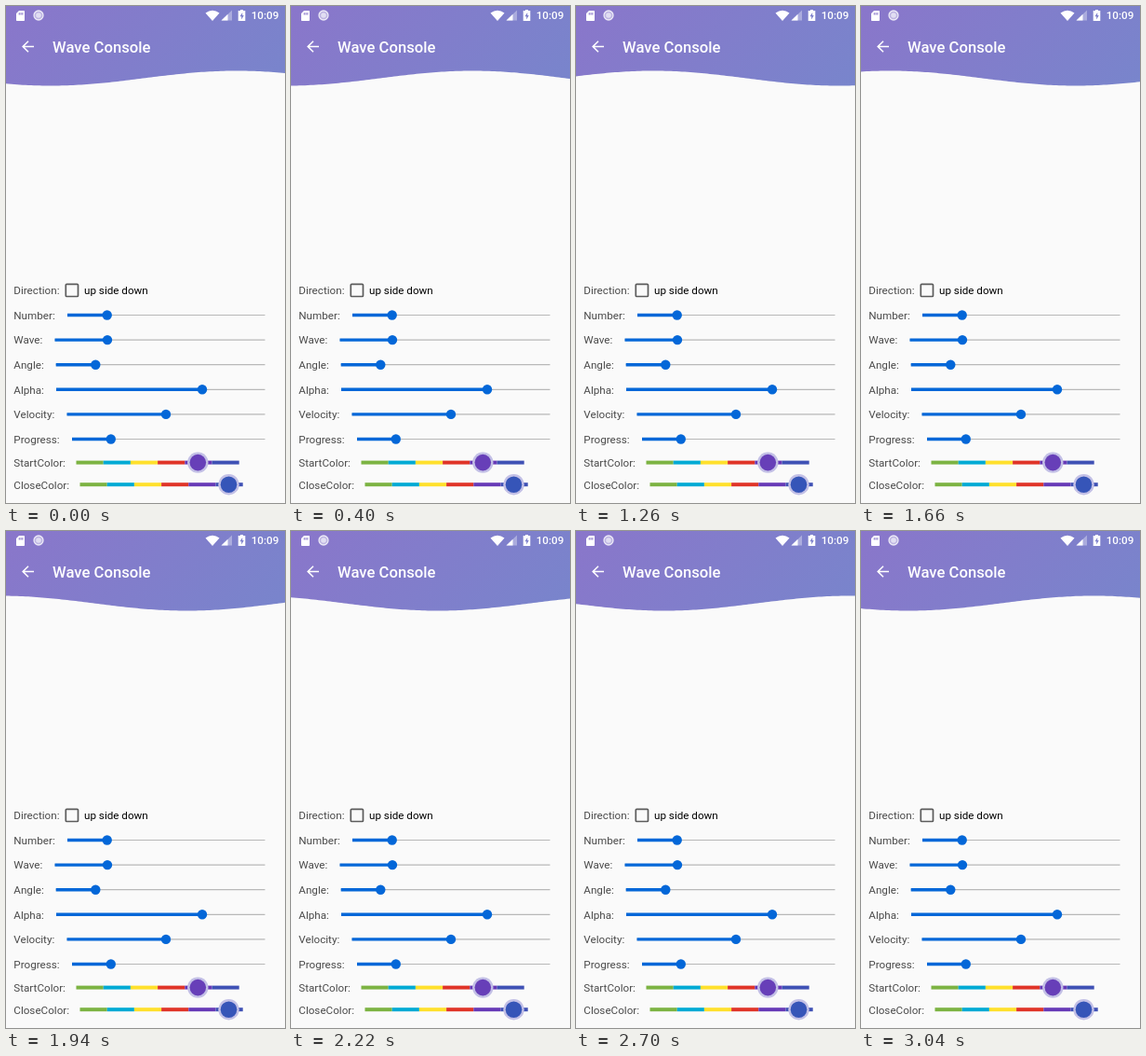
Animation, 300 px wide and 533 px high, one loop 3060 ms. Source, as an HTML page:

```html
<!DOCTYPE html>
<html lang="en">
<head>
<meta charset="utf-8">
<title>Wave Console</title>
<style>
html, body { margin: 0; width: 100%; height: 100%; overflow: hidden; background: #fafafa; }
svg { display: block; font: 11.67px Roboto, sans-serif; }
.label { fill: #4a4a4a; }
.bar { fill: #fff; font-weight: 500; }
</style>
</head>
<body>
<svg id="stage" width="300" height="533" viewBox="0 0 300 533">
  <defs>
    <linearGradient id="tint" gradientUnits="userSpaceOnUse" x1="40" y1="-67" x2="260" y2="153">
      <stop stop-color="#8b75ca"/><stop offset="1" stop-color="#7786cc"/>
    </linearGradient>
  </defs>
  <path id="wave" fill="url(#tint)"/>
  <!-- status bar -->
  <path fill="#fff" fill-rule="evenodd" d="M14 5H19.2Q20 5 20 5.8V15.2Q20 16 19.2 16H11.8Q11 16 11 15.2V8ZM13.7 7.2V9.6H14.8V7.2ZM15.5 7.2V9.6H16.6V7.2ZM17.3 7.2V9.6H18.4V7.2Z"/>
  <circle cx="35" cy="10" r="5" fill="#fff" fill-opacity=".45" stroke="#fff" stroke-opacity=".8" stroke-width="1.3"/>
  <circle cx="35" cy="10" r="2.8" fill="#fff" fill-opacity=".55"/>
  <path fill="#fff" d="M214.5 7.5Q222 2 229.5 7.5L222 16Z"/>
  <path fill="#fff" fill-opacity=".35" d="M243 4.5V15.5H231.5Z"/>
  <path fill="#fff" d="M238.5 8.8V15.5H231.5Z"/>
  <path fill="#fff" fill-rule="evenodd" d="M252 4H255V5H257.3V16H249.7V5H252ZM254.2 7L251.5 11.2H253.2V14.4L255.8 10.1H254.2Z"/>
  <text class="bar" x="263.7" y="14.2">10:09</text>
  <!-- toolbar -->
  <path d="M30 43.5H18.5M24 37.8L18.2 43.5L24 49.2" fill="none" stroke="#fff" stroke-width="1.6"/>
  <text class="bar" x="50" y="49.5" font-size="16.67">Wave Console</text>
  <!-- controls -->
  <text class="label" x="8.3" y="309">Direction:</text>
  <rect x="64.3" y="298.3" width="13.2" height="13.2" rx="1" fill="none" stroke="#5c5c5c" stroke-width="1.7"/>
  <text x="84" y="309">up side down</text>
  <g id="controls"></g>
</svg>
<script>
const LOOP = 3060, LENGTH = 400, MID = 77.5, AMP = 8, START = 48;
const wave = document.getElementById('wave');
const colors = ['#7cb342', '#00aad4', '#ffe02c', '#e03428', '#673ab7', '#3f51b5'];

const label = (name, y) => `<text class="label" x="8.3" y="${y + 4.3}">${name}:</text>`;
const line = (x1, x2, y, color, width) =>
  `<path d="M${x1} ${y}H${x2}" stroke="${color}" stroke-width="${width}"/>`;
const dot = (x, y, r, color, alpha = 1) =>
  `<circle cx="${x}" cy="${y}" r="${r}" fill="${color}" fill-opacity="${alpha}"/>`;

const slider = ([name, left, thumb], i) => {
  const y = 331.5 + i * 26.6;
  return label(name, y) + line(left, 278.5, y, '#b8b8b8', 1.2) +
    line(left, thumb, y, '#0467d8', 3.4) + dot(thumb, y, 5.2, '#0467d8');
};

const picker = (name, left, thumb, y, color) =>
  label(name, y) +
  colors.map((c, i) => line(left + i * 29.2, left + (i + 1) * 29.2, y, c, 4)).join('') +
  dot(thumb, y, 11.2, '#c3c0e6') + dot(thumb, y, 8.8, color);

document.getElementById('controls').innerHTML = [
  ['Number', 66, 108.7], ['Wave', 52.5, 109], ['Angle', 53.7, 96.3],
  ['Alpha', 54, 211], ['Velocity', 65.5, 172], ['Progress', 71, 112.8]
].map(slider).join('') +
  picker('StartColor', 75.5, 206.3, 489.6, '#673fb8') +
  picker('CloseColor', 79.5, 239.5, 513.2, '#3655b8');

function draw(now) {
  const trough = START - LENGTH * (now % LOOP) / LOOP;
  let d = 'M0 0';
  for (let x = 0; x <= 300; x += 3) {
    d += `L${x} ${(MID + AMP * Math.cos(2 * Math.PI * (x - trough) / LENGTH)).toFixed(2)}`;
  }
  wave.setAttribute('d', d + 'V0Z');
  requestAnimationFrame(draw);
}
draw(0);
</script>
</body>
</html>
```
